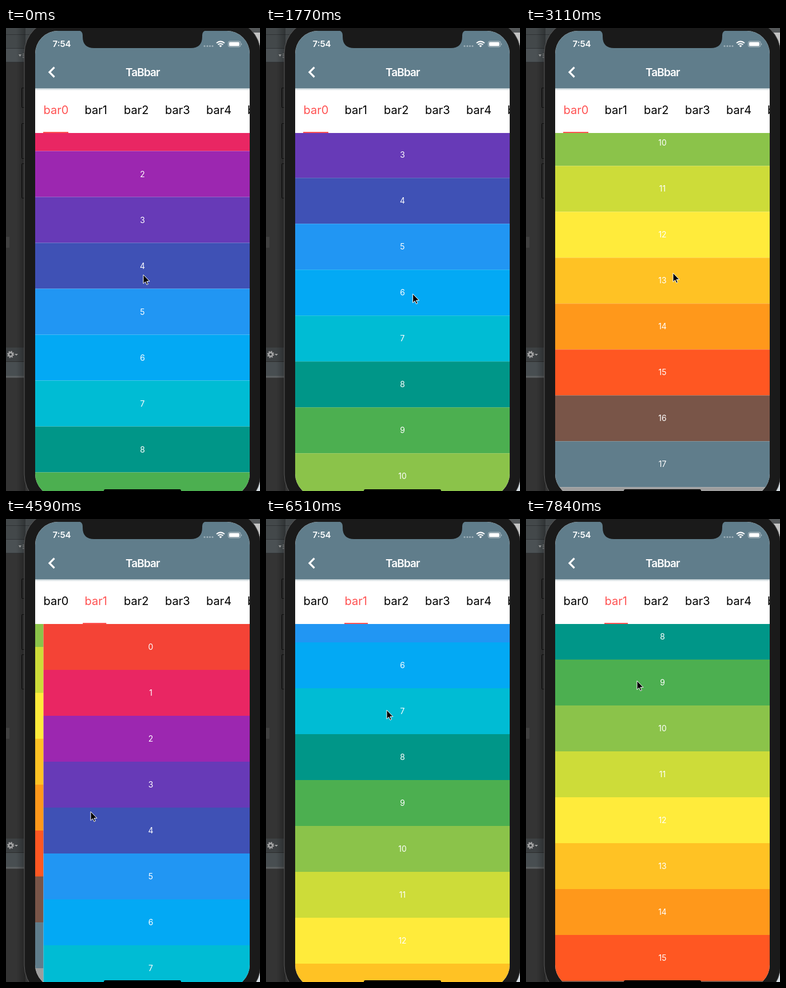
Recreate the animation shown at these times as an HTML page. Size 444 px wide and 807 px high, loop 7.99 s.

```html
<!DOCTYPE html>
<html>
<head>
<meta charset="utf-8">
<style>
html, body { margin: 0; width: 100%; height: 100%; overflow: hidden; background: #343434; }
svg { display: block; width: 444px; height: 807px; }
text { font-family: Inter, "Liberation Sans", sans-serif; }
.row { font-size: 14px; fill: #fff; text-anchor: middle; }
.tab { font-size: 20px; }
</style>
</head>
<body>
<svg viewBox="0 0 444 807">
  <defs>
    <clipPath id="screen"><rect x="51" y="5" width="375" height="812" rx="40"/></clipPath>
    <clipPath id="view"><rect x="51" y="183" width="375" height="634"/></clipPath>
    <linearGradient id="shade">
      <stop stop-color="#000" stop-opacity="0"/><stop offset="1" stop-color="#000" stop-opacity=".3"/>
    </linearGradient>
    <linearGradient id="drop" x2="0" y2="1">
      <stop stop-color="#bccad0"/><stop offset="1" stop-color="#fff"/>
    </linearGradient>
  </defs>

  <!-- desktop behind the phone -->
  <rect width="60" height="60" fill="#43484a"/>
  <path d="M0 11.5H60M0 35.5H60M0 59.5H60" stroke="#303335"/>
  <rect y="36" width="40" height="23" fill="#4b5154"/>
  <path d="M22 46h5l-2.500 4z" fill="#b0b0b0"/>
  <path d="M29 45.500h5M29 48.500h5M29 51.500h5" stroke="#b0b0b0"/>
  <rect y="364" width="6" height="19" fill="#414141"/>
  <rect y="557" width="60" height="24" fill="#3d4143"/>
  <circle cx="8" cy="569" r="3.400" fill="none" stroke="#a5a5a5" stroke-width="2.600"/>
  <circle cx="8" cy="569" r="5.300" fill="none" stroke="#a5a5a5" stroke-width="1.800" stroke-dasharray="2.080"/>
  <path d="M15 568h6l-3 3z" fill="#a5a5a5"/>
  <rect y="581" width="60" height="26" fill="#484e51"/>
  <path d="M0 581.500H60" stroke="#2c2c2c"/>
  <path d="M0 608H60" stroke="#5e6163" stroke-width="3"/>
  <rect x="18" width="16" height="807" fill="url(#shade)"/>
  <rect x="400" width="44" height="8" fill="#55585a"/>
  <rect x="400" y="8" width="44" height="60" fill="#c4c4c4"/>
  <rect x="400" y="760" width="44" height="47" fill="#d5dde2"/>

  <!-- phone body -->
  <g fill="#262626" stroke="#0a0a0a">
    <rect x="27.500" y="104.500" width="8" height="34" rx="1"/>
    <rect x="27.500" y="166.500" width="8" height="61" rx="1"/>
    <rect x="27.500" y="236.500" width="8" height="60" rx="1"/>
  </g>
  <rect x="32" y="-14" width="413" height="850" rx="58" fill="#1a1a1a" stroke="#5c5c5c"/>

  <g clip-path="url(#screen)">
    <rect x="51" y="5" width="375" height="812" fill="#fff"/>
    <rect x="51" y="5" width="375" height="100" fill="#607d8b"/>
    <rect x="51" y="105" width="375" height="4" fill="url(#drop)"/>
    <g id="tabs"></g>
    <g clip-path="url(#view)"><g id="page0"></g><g id="page1"></g></g>
    <rect id="mark" y="181" height="2" fill="#ff5252"/>
    <rect x="171" y="804" width="135" height="5" rx="2.500"/>
    <path d="M126 4Q134 5 134 13V15Q134 35 154 35H323Q343 35 343 15V13Q343 5 351 4Z" fill="#1a1a1a"/>
  </g>

  <!-- status and title bar -->
  <g fill="#fff">
    <text x="81.500" y="33" font-size="15" font-weight="600">7:54</text>
    <text x="209" y="84" font-size="19" font-weight="600" letter-spacing="-.9">TaBbar</text>
    <g opacity=".4">
      <circle cx="347" cy="31.500" r="1.500"/><circle cx="352" cy="31.500" r="1.500"/>
      <circle cx="356.500" cy="31.500" r="1.500"/><circle cx="361" cy="31.500" r="1.500"/>
    </g>
    <path d="M372.500 31L375 33.500 377.500 31Q375 29 372.500 31Z"/>
    <rect x="390" y="24.500" width="18" height="7" rx="1.500"/>
    <path d="M411.500 26.500q1.500 1.500 0 3.500z"/>
  </g>
  <g fill="none" stroke="#fff">
    <path d="M368 26.300Q375 20.500 382 26.300M370.500 29Q375 25.500 379.500 29" stroke-width="2"/>
    <rect x="388.500" y="23" width="21.500" height="10" rx="3" stroke-opacity=".5"/>
    <path d="M84.500 68.500L76 77l8.500 8.500" stroke-width="3.200"/>
  </g>

  <path id="cursor" d="M0 0V15.500L3.600 12.200 6 17.500 8.400 16.400 6 11.400H11Z" fill="#000" stroke="#fff"/>
</svg>

<script>
const $ = id => document.getElementById(id);
const ROW = 80, LEFT = 51, TOP = 183, WIDTH = 375;
const LOOP = 7990, STEP = 148, LAST = 53;

const colors = ('f44336 e92663 9c27b0 673ab7 3f51b5 2196f3 03a9f4 00bcd4 009688 4caf50 ' +
  '8bc34a cddc39 ffeb3b ffc224 ff981b ff5722 795548 607d8b 9e9e9e').split(' ');
const tabX = [65.5, 137.5, 206, 278, 350, 422];

const rows = colors.map((c, i) =>
  `<rect x="${LEFT}" y="${TOP + i * ROW}" width="${WIDTH}" height="${ROW}" fill="#${c}"/>` +
  `<text class="row" x="238.500" y="${TOP + i * ROW + 45}">${i}</text>`).join('');
$('page0').innerHTML = $('page1').innerHTML = rows;
$('tabs').innerHTML = tabX.map((x, i) => `<text class="tab" x="${x}" y="150">bar${i}</text>`).join('');

// Keys are [step, value, power]: a positive power eases out, a negative one eases in.
const scroll0 = [[0, 128.5], [9, 196.5, 1.5], [16, 443, -2], [23, 840, 2.5]];
const scroll1 = [[39, 0], [42, 150, -2], [44, 448, 1], [49, 658, 2.5]];
const slide = [[23, 0], [28, .5, -2], [31, .9613, 2], [34, 1, 2]];
const mouseX = [[0, 240], [9, 256, 1], [14, 257, 1], [23, 257, 1], [29, 148, 1], [31, 148, 1],
  [39, 211, 1], [51, 211, 1], [53, 194, 1]];
const mouseY = [[0, 430], [9, 518, 1], [14, 427, 1], [23, 427, 1], [29, 510, 1], [31, 510, 1],
  [39, 480, 1], [43, 333, 1], [44, 333, 1], [48, 341, 1], [51, 341, 1], [53, 282, 1]];

function at(keys, step) {
  const n = keys.findIndex(k => k[0] > step);
  if (n < 0) return keys[keys.length - 1][1];
  if (n === 0) return keys[0][1];
  const [t0, a] = keys[n - 1], [t1, b, power] = keys[n];
  const u = (step - t0) / (t1 - t0);
  return a + (b - a) * (power > 0 ? 1 - (1 - u) ** power : u ** -power);
}

const move = (id, x, y) => $(id).setAttribute('transform', `translate(${x} ${y})`);

function draw(ms) {
  // The screen refreshes in even steps.
  const step = Math.min(LAST, Math.floor((ms % LOOP + 12) / STEP));
  const p = at(slide, step);
  move('page0', -WIDTH * p, -at(scroll0, step));
  move('page1', WIDTH * (1 - p), -at(scroll1, step));
  move('cursor', at(mouseX, step), at(mouseY, step));
  $('mark').setAttribute('x', 65 + 72 * p);
  $('mark').setAttribute('width', 44 - 3 * p);
  const active = p < .5 ? 0 : 1;
  [...$('tabs').children].forEach((tab, i) => tab.setAttribute('fill', i === active ? '#ff5252' : '#000'));
}

const start = performance.now();
function tick() {
  draw(performance.now() - start);
  requestAnimationFrame(tick);
}
tick();
</script>
</body>
</html>
```
